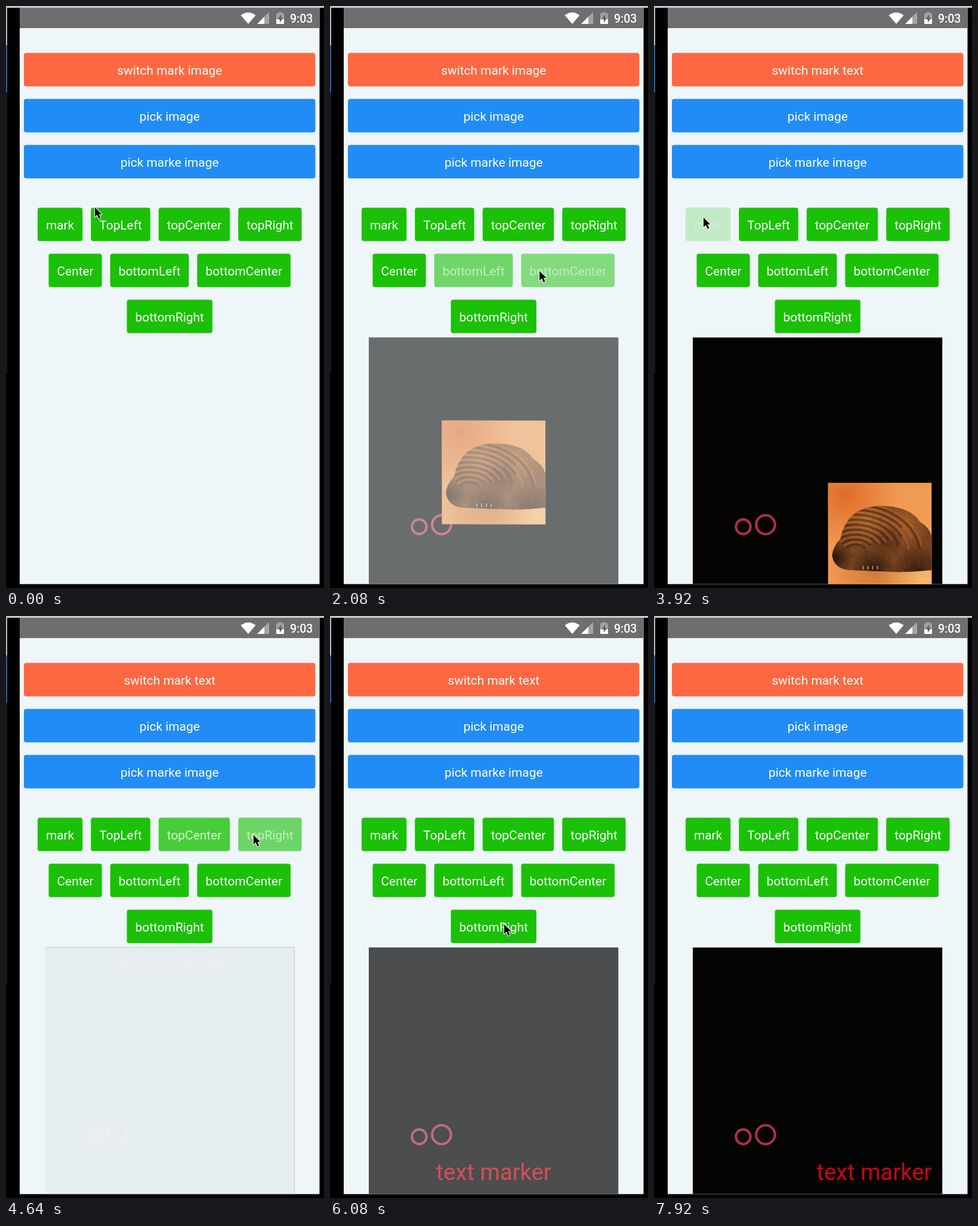
Write an HTML page with a canvas that moves like this. It is 533 px wide and 974 px high and loops after 8000 ms.

```html
<!DOCTYPE html>
<html lang="en">
<head>
<meta charset="utf-8">
<title>Image marker demo</title>
<style>
html, body { margin: 0; width: 100%; height: 100%; overflow: hidden; background: #000; }
canvas { display: block; }
</style>
</head>
<body>
<canvas id="stage" width="533" height="974"></canvas>
<script>
const ctx = document.getElementById('stage').getContext('2d');
const LOOP = 8000, STEP = 80, LOAD_DELAY = 170, FADE = 300;
const PAGE = { x: 23, y: 3, w: 502.5, h: 964.5, fill: '#eff6f9' };
const PANEL = { x: 65, y: 554.5, w: 418.5, h: 413 };
const MARGIN = 18, PHOTO = 174;
const BUTTON_H = 56, PITCH = 77, PADDING = 14, LABEL_SIZE = 20.9, MARK_SIZE = 38.2;

const clamp = v => Math.max(0, Math.min(1, v));
const mix = (a, b, k) => a + (b - a) * k;
const smooth = k => k * k * (3 - 2 * k);

function setFont(size, weight = 400) {
  ctx.font = `${weight} ${size}px Roboto, sans-serif`;
}

function text(str, x, y, size, fill, align = 'left', weight) {
  setFont(size, weight);
  ctx.textAlign = align;
  ctx.fillStyle = fill;
  ctx.fillText(str, x, y);
}

function rect(x, y, w, h, fill) {
  ctx.fillStyle = fill;
  ctx.fillRect(x, y, w, h);
}

function shape(d, fill) {
  ctx.fillStyle = fill;
  ctx.fill(new Path2D(d));
}

function clipTo(x, y, w, h) {
  ctx.beginPath();
  ctx.rect(x, y, w, h);
  ctx.clip();
}

function textWidth(str, size) {
  setFont(size);
  return ctx.measureText(str).width;
}

// Layout: three full-width buttons, then centred rows of fitted ones.
const wide = ['switch', 'pick image', 'pick marke image'].map((label, i) => ({
  label, x: 30, y: 78.5 + i * PITCH, w: 488.5, fill: i ? '#218cf5' : '#ff6741',
}));
const rows = [
  ['mark', 'TopLeft', 'topCenter', 'topRight'],
  ['Center', 'bottomLeft', 'bottomCenter'],
  ['bottomRight'],
];
const fitted = rows.flatMap((row, r) => {
  const widths = row.map(label => textWidth(label, LABEL_SIZE) + 2 * PADDING);
  const total = widths.reduce((sum, w) => sum + w + PADDING, -PADDING);
  let x = PAGE.x + (PAGE.w - total) / 2;
  return row.map((label, i) => {
    const button = { label, x, y: 337.5 + r * PITCH, w: widths[i], fill: '#1ac106' };
    x += widths[i] + PADDING;
    return button;
  });
});
const buttons = [...wide, ...fitted];

// Each round presses the fitted buttons in order.
const SWITCH_AT = 3400;
const round = (mode, times) => times.map((time, i) => ({ time, mode, button: fitted[i] }));
const marks = [
  ...round('photo', [280, 600, 910, 1500, 1740, 1960, 2150, 2840]),
  ...round('text', [3960, 4220, 4460, 4720, 5340, 5520, 5700, 6240]),
];
const clicks = [...marks, { time: SWITCH_AT, button: wide[0] }];

// The pointer visits every pressed button and drifts through a few extra points.
const path = [
  ...clicks.map(({ time, button: b }) => [time, b.x + b.w / 2, b.y + BUTTON_H / 2]),
  [0, 148, 336], [1280, 297, 376], [2640, 287, 495], [3920, 82, 353],
  [5200, 162, 443], [6080, 291, 515], [7200, 300, 980],
].sort((a, b) => a[0] - b[0]);

function drawScreen() {
  rect(0, 0, 533, 974, '#000');
  rect(0, 0, 533, 3, '#c9cbc6');
  rect(0, 0, 2, 66, '#b9bcbc');
  rect(0, 66, 2, 79, '#1b63b4');
  rect(0, 145, 2, 470, '#16181b');
  rect(PAGE.x, PAGE.y, PAGE.w, PAGE.h, PAGE.fill);
  rect(PAGE.x, PAGE.y, PAGE.w, 34, '#6e6e6e');
  shape('M393.5 15.5Q406 6 418.5 15.5L406 30Z', '#fff');
  shape('M441 10V30H421Z', '#a5a5a5');
  shape('M433 18V30H421Z', '#fff');
  shape('M453 12H457V10H462V12H466V30H453Z', '#a0a0a0');
  rect(453, 22, 13, 8, '#fff');
  shape('M461 14L455.5 22.5H459V28L464 20H461Z', '#606060');
  text('9:03', 476, 28, 19.5, '#fff', 'left', 500);
}

function pressOpacity(button, t) {
  const dips = clicks.filter(c => c.button === button).map(({ time }) =>
    t < time ? clamp((t - time + 120) / 80) : 1 - clamp((t - time) / 250));
  return 1 - 0.79 * Math.max(0, ...dips);
}

function drawButton(button, t) {
  const { label, x, y, w, fill } = button;
  ctx.globalAlpha = pressOpacity(button, t);
  ctx.beginPath();
  ctx.roundRect(x, y, w, BUTTON_H, 4);
  ctx.fillStyle = fill;
  ctx.fill();
  text(label, x + w / 2, y + 36.3, LABEL_SIZE, '#fff', 'center');
  ctx.globalAlpha = 1;
}

function ring(x, y, r) {
  ctx.beginPath();
  ctx.arc(x, y, r, 0, 7);
  ctx.strokeStyle = '#b02e54';
  ctx.lineWidth = 4;
  ctx.stroke();
}

function glow(x, y, r, color) {
  const g = ctx.createRadialGradient(x, y, 0, x, y, r);
  g.addColorStop(0, color);
  g.addColorStop(1, color.slice(0, 7) + '00');
  rect(x - r, y - r, 2 * r, 2 * r, g);
}

// Soft study of a curled-up puppy: light, silhouette, folds and seeded fur.
function drawPuppy(x, y) {
  let seed = 7;
  const random = () => (seed = seed * 16807 % 2147483647) / 2147483647;
  ctx.save();
  ctx.translate(x, y);
  clipTo(0, 0, PHOTO, PHOTO);
  rect(0, 0, PHOTO, PHOTO, '#f09b52');
  glow(30, 20, 90, '#e06c2a');
  glow(150, 170, 110, '#fab970');
  glow(80, 148, 80, '#b8581f90');

  const body = new Path2D('M7 121Q9 105 21 94Q26 65 48 49Q70 36 99 39Q139 42 154 65Q170 74 174 90V146Q128 151 87 148L34 146Q10 143 7 121Z');
  ctx.fillStyle = '#76421f';
  ctx.fill(body);
  ctx.clip(body);
  glow(66, 62, 48, '#b86c32');
  glow(130, 66, 42, '#a35c2a');
  glow(12, 126, 30, '#2c160c');
  glow(76, 146, 38, '#2a150b');
  glow(150, 150, 46, '#341b0e');
  glow(98, 98, 30, '#4a2612b0');

  ctx.lineWidth = 4;
  for (let i = 0; i < 9; i++) {
    const r = 20 + i * 11;
    const start = -2.5 + random() * 0.7;
    for (const [shift, color] of [[0, '#3b1e0f80'], [4, '#b76c3560']]) {
      ctx.beginPath();
      ctx.ellipse(46, 118, r + shift, r * 0.75 + shift, 0, start, start + 1.2 + random() * 0.8);
      ctx.strokeStyle = color;
      ctx.stroke();
    }
  }
  ctx.lineWidth = 1;
  for (let i = 0; i < 400; i++) {
    const fx = random() * PHOTO, fy = 38 + random() * 112;
    ctx.beginPath();
    ctx.moveTo(fx, fy);
    ctx.lineTo(fx + 2 + random() * 3, fy + random() * 6);
    ctx.strokeStyle = i % 2 ? '#c77a3e40' : '#2a130840';
    ctx.stroke();
  }
  for (let i = 0; i < 4; i++) rect(58 + i * 8, 139, 2, 6, '#b08d70');
  ctx.restore();
}

function drawMark(mode, name) {
  const isText = mode === 'text';
  const col = /left|mark/i.test(name) ? 0 : /right/i.test(name) ? 1 : 0.5;
  const row = /top|mark/i.test(name) ? 0 : /bottom/.test(name) ? 1 : 0.5;
  const width = isText ? textWidth('text marker', MARK_SIZE) : PHOTO;
  const margin = isText && row === 0 ? 0 : MARGIN;
  const x = mix(PANEL.x + margin, PANEL.x + PANEL.w - margin - width, col);
  if (isText) text('text marker', x, mix(590, 943.5, row), MARK_SIZE, '#cb0511');
  else drawPuppy(x, mix(589, 798, row));
}

function drawPreview(t) {
  const mark = marks.findLast(m => t >= m.time + LOAD_DELAY);
  if (!mark) return;
  const { x, y, w, h } = PANEL;
  ctx.save();
  clipTo(x, y, w, h);
  rect(x, y, w, h, '#040404');
  ring(149.5, 871.5, 12.2);
  ring(187, 868, 15.8);
  drawMark(mark.mode, mark.button.label);
  // The whole preview fades in over the page colour.
  ctx.globalAlpha = 1 - clamp((t - mark.time - LOAD_DELAY) / FADE);
  rect(x, y, w, h, PAGE.fill);
  ctx.restore();
}

function drawPointer(t) {
  const next = path.findIndex(p => p[0] > t);
  if (next < 1) return;
  const [t0, x0, y0] = path[next - 1], [t1, x1, y1] = path[next];
  const k = smooth(clamp(1 - (t1 - t) / Math.min(400, t1 - t0)));
  const arrow = new Path2D('M1 1V17L4.8 13.5L7.6 20L10.5 18.7L7.7 12.5H12.5Z');
  ctx.save();
  ctx.translate(mix(x0, x1, k), mix(y0, y1, k));
  ctx.lineJoin = 'round';
  ctx.lineWidth = 2;
  ctx.strokeStyle = '#fff';
  ctx.stroke(arrow);
  ctx.fillStyle = '#000';
  ctx.fill(arrow);
  ctx.restore();
}

function render(t) {
  wide[0].label = 'switch mark ' + (t < SWITCH_AT ? 'image' : 'text');
  drawScreen();
  buttons.forEach(b => drawButton(b, t));
  drawPreview(t);
  drawPointer(t);
}

const began = performance.now();
function tick() {
  const elapsed = (performance.now() - began) % LOOP;
  render(Math.floor(elapsed / STEP) * STEP);
  requestAnimationFrame(tick);
}
tick();
</script>
</body>
</html>
```
